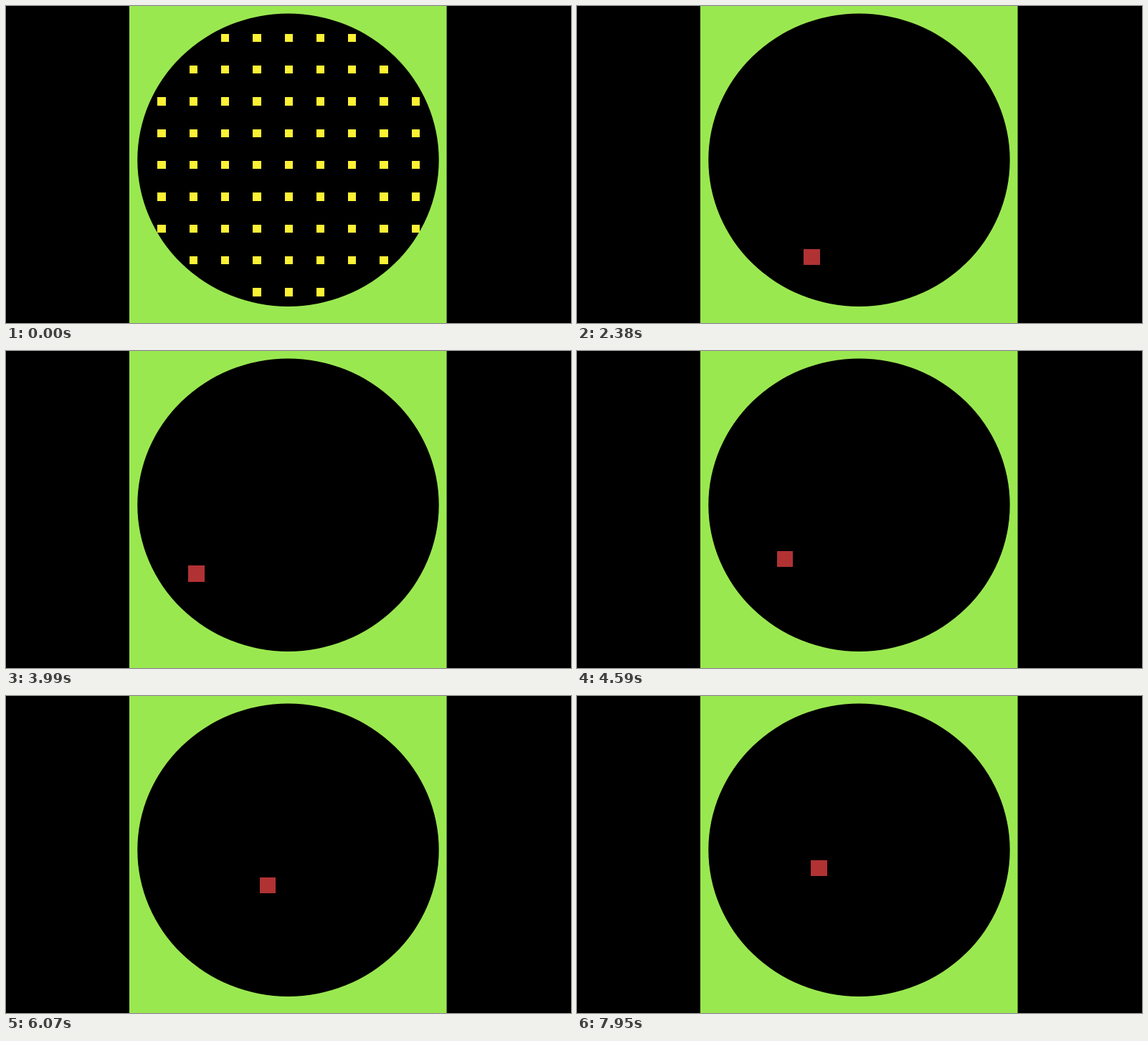
An HTML page with a canvas for the animation above (7990 ms loop, 788 px wide and 442 px high).

```html
<!DOCTYPE html>
<html lang="en">
<head>
<meta charset="utf-8">
<title>Arena walk</title>
<style>
  html, body { margin: 0; width: 100%; height: 100%; overflow: hidden; background: #000; }
  canvas { display: block; }
</style>
</head>
<body>
<canvas width="788" height="442"></canvas>
<script>
const LOOP = 7990, WALK_START = 920;
const CELL = 11.075, PITCH = 4 * CELL, BLEED = 0.25;
const ARENA = { left: 172, width: 442.6, cx: 393.5, cy: 214.7, rx: 210.2, ry: 204.2 };
const GREEN = '#9ae850', YELLOW = '#fdf135', RED = '#b13233';

// Turning points of the walk
const PATH = [
  { t: 920, x: 393, y: 407 },
  { t: 1630, x: 357, y: 391 },
  { t: 3110, x: 300, y: 314 },
  { t: 4000, x: 265.5, y: 310.5 },
  { t: 5260, x: 328, y: 268 },
  { t: 6910, x: 387, y: 263 },
  { t: 7960, x: 337, y: 239.5 }
];

const ctx = document.querySelector('canvas').getContext('2d');

// Centred square on whole pixels
function square(x, y, size, color) {
  const half = size / 2 + BLEED / 2;
  const left = Math.round(x - half), top = Math.round(y - half);
  ctx.fillStyle = color;
  ctx.fillRect(left, top, Math.round(x + half) - left, Math.round(y + half) - top);
}

function drawArena() {
  ctx.fillStyle = '#000';
  ctx.fillRect(0, 0, 788, 442);
  ctx.fillStyle = GREEN;
  ctx.fillRect(ARENA.left, 0, ARENA.width, 442);
  ctx.fillStyle = '#000';
  ctx.beginPath();
  ctx.ellipse(ARENA.cx, ARENA.cy, ARENA.rx, ARENA.ry, 0, 0, 2 * Math.PI);
  ctx.fill();
}

function drawDots() {
  for (let row = 1; row <= 9; row++) {
    for (let col = 1; col <= 9; col++) {
      const x = ARENA.left + 0.7 + col * PITCH, y = 0.2 + row * PITCH;
      const reach = Math.hypot((x - ARENA.cx) / ARENA.rx, (y - ARENA.cy) / ARENA.ry);
      if (reach < 0.98) square(x, y, CELL, YELLOW);
    }
  }
}

// Smooth curve through the turning points
function walkerAt(time) {
  const last = PATH.length - 1;
  const i = Math.max(0, PATH.findLastIndex((p, k) => k < last && p.t <= time));
  const a = PATH[i], b = PATH[i + 1], span = b.t - a.t;
  const u = Math.min(1, (time - a.t) / span), v = 1 - u;
  const slope = (k, axis) => {
    const p = PATH[Math.max(k - 1, 0)], n = PATH[Math.min(k + 1, last)];
    return span * (n[axis] - p[axis]) / (n.t - p.t);
  };
  return ['x', 'y'].map(axis =>
    v * v * (a[axis] * (1 + 2 * u) + slope(i, axis) * u) +
    u * u * (b[axis] * (1 + 2 * v) - slope(i + 1, axis) * v));
}

function draw(time) {
  drawArena();
  if (time < WALK_START) drawDots();
  else square(...walkerAt(time), 2 * CELL, RED);
}

const start = performance.now();
function tick() {
  draw((performance.now() - start) % LOOP);
  requestAnimationFrame(tick);
}
tick();
</script>
</body>
</html>
```
